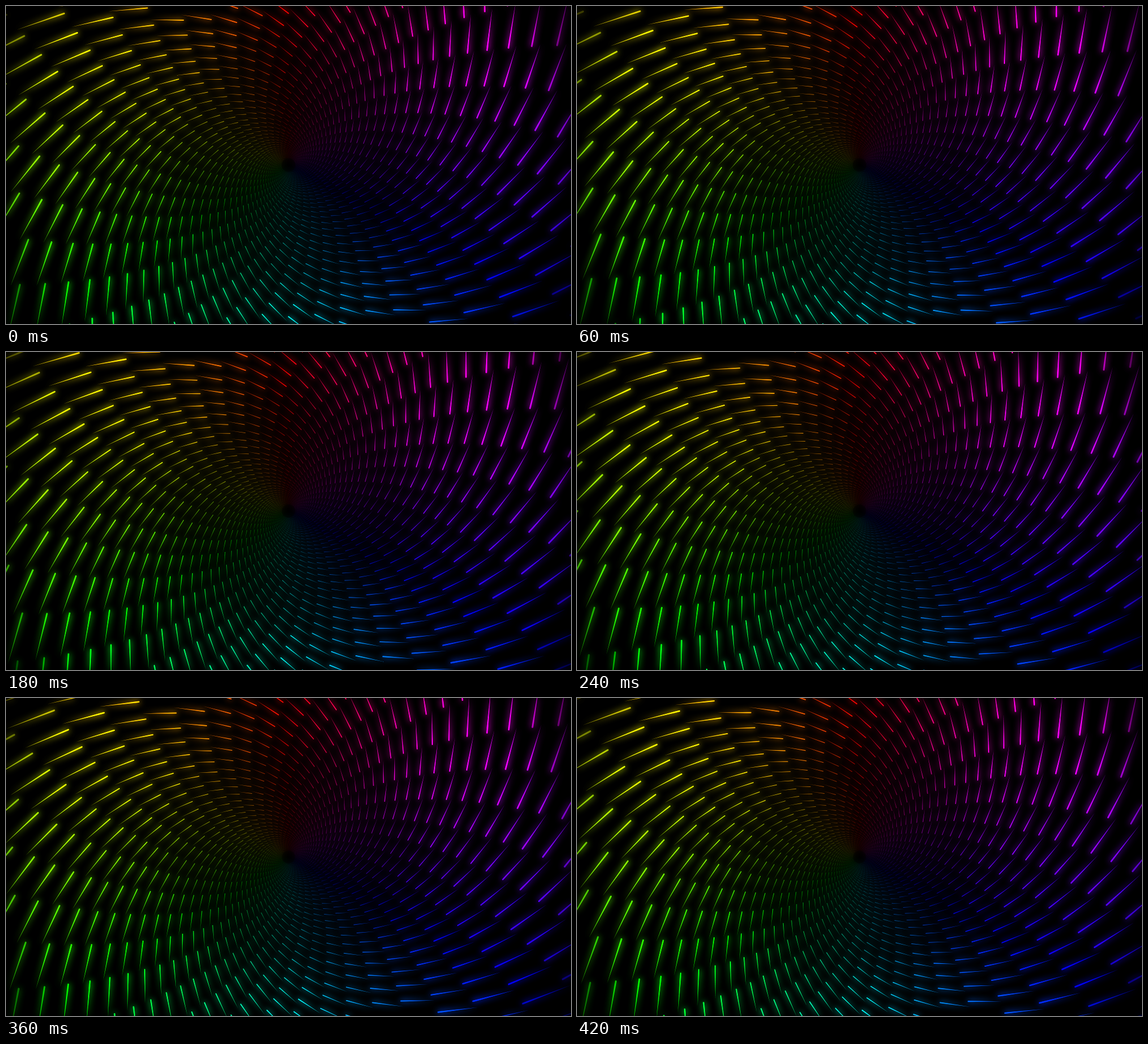
These frames come from a looping animation (998x561 px, 480 ms). An HTML page with a canvas:

```html
<!DOCTYPE html>
<html lang="en">
<head>
<meta charset="utf-8">
<title>Rainbow vortex</title>
<style>
  html, body { margin: 0; width: 100%; height: 100%; overflow: hidden; background: #000; }
  canvas { display: block; }
</style>
</head>
<body>
<canvas id="stage" width="998" height="561"></canvas>
<script>
const W = 998, H = 561;
const STEP_MS = 60, STEPS = 8;
const SPOKES = 36;
const SHRINK = 0.9204;          // radius ratio between neighbouring rings
const BASE_RADIUS = 440, BASE_ANGLE = 212;
const DASH_LENGTH = 0.185, DASH_WIDTH = 0.006;   // relative to the radius
const DASH_TILT = 53;           // degrees between the dash and the radius
const GLOW_PASSES = 2;
const RAD = Math.PI / 180;

const ctx = document.getElementById('stage').getContext('2d');
const layer = document.createElement('canvas');
layer.width = W;
layer.height = H;
const dashes = layer.getContext('2d');

// Dashes fade out towards the centre and towards the corners.
const brightness = radius => Math.max(0, Math.min(1, radius / 240, (590 - radius) / 170));

// A dash with a round head at the given polar position and a tapering tail.
function drawDash(radius, degrees) {
  const angle = degrees * RAD;
  const x = W / 2 + radius * Math.cos(angle);
  const y = H / 2 + radius * Math.sin(angle);
  const tail = angle - DASH_TILT * RAD;
  const length = radius * DASH_LENGTH;
  const cap = Math.max(1, radius * DASH_WIDTH) / 2;

  dashes.fillStyle = `hsl(${-90 - degrees}, 100%, 50%)`;
  dashes.beginPath();
  dashes.arc(x, y, cap, tail + Math.PI / 2, tail - Math.PI / 2);
  dashes.lineTo(x + length * Math.cos(tail), y + length * Math.sin(tail));
  dashes.fill();
}

// In one loop every dash moves one ring inward and turns by 8 degrees.
function render(progress) {
  dashes.clearRect(0, 0, W, H);
  for (let ring = -4; ring < 44; ring++) {
    const radius = BASE_RADIUS * SHRINK ** (ring + progress);
    const start = BASE_ANGLE - 2 * ring + 8 * progress;
    dashes.globalAlpha = brightness(radius);
    for (let spoke = 0; spoke < SPOKES; spoke++) {
      drawDash(radius, start + spoke * 360 / SPOKES);
    }
  }

  ctx.globalCompositeOperation = 'source-over';
  ctx.fillStyle = '#000';
  ctx.fillRect(0, 0, W, H);
  ctx.globalCompositeOperation = 'lighter';
  ctx.drawImage(layer, 0, 0);
  ctx.filter = 'blur(6px)';
  for (let pass = 0; pass < GLOW_PASSES; pass++) ctx.drawImage(layer, 0, 0);
  ctx.filter = 'none';
}

let shown = -1;
function tick() {
  const step = Math.floor(performance.now() / STEP_MS) % STEPS;
  if (step !== shown) {
    shown = step;
    render(step / STEPS);
  }
  requestAnimationFrame(tick);
}
tick();
</script>
</body>
</html>
```
